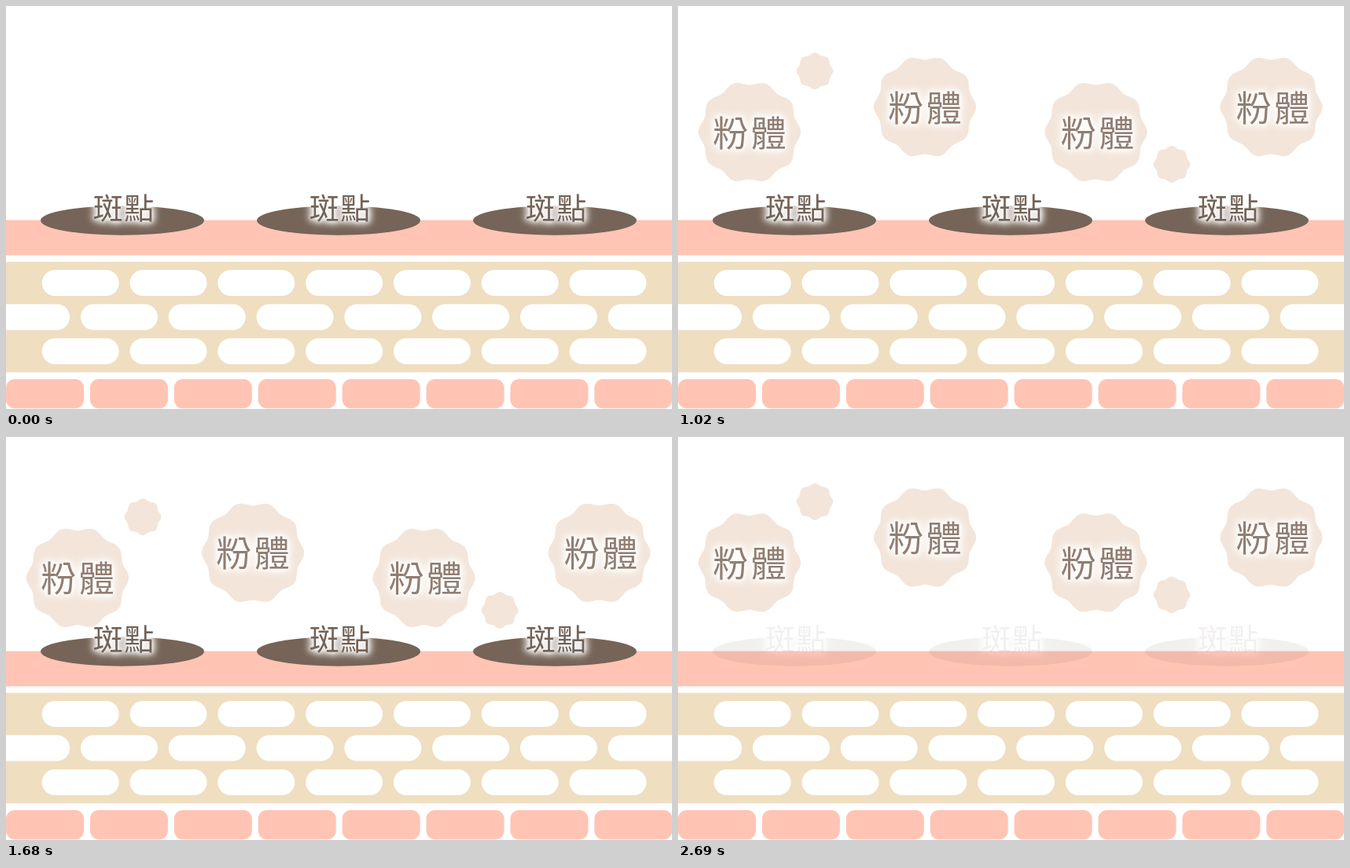
Write an HTML page that moves like this. It is 847 px wide and 513 px high and loops after 3.22 s.

```html
<!DOCTYPE html>
<html lang="zh-Hant">
<head>
<meta charset="utf-8">
<style>
html, body { margin: 0; width: 100%; height: 100%; overflow: hidden; background: #fff; }
svg { display: block; }
text {
  font-family: "Noto Sans CJK TC", "Noto Sans CJK", "Noto Sans CJK JP", sans-serif;
  text-anchor: middle;
  filter: drop-shadow(0 0 2px #fff) drop-shadow(0 0 4px #fff) drop-shadow(0 0 5px #fff);
}
#spots text { font-size: 38px; letter-spacing: 1.5px; fill: #736257; }
#powder text { font-size: 45px; letter-spacing: 3.5px; fill: #917e72; }
#powder path { fill: #f3e5da; }
#spots ellipse { fill: #756457; }
</style>
</head>
<body>
<svg width="847" height="513" viewBox="0 0 847 513">
  <g id="skin"></g>
  <g id="spots"></g>
  <g id="powder"></g>
</svg>
<script>
const LOOP = 3220, STEP = 30, PINK = '#ffc4b4';
const [skin, spots, powder] = ['skin', 'spots', 'powder'].map(id => document.getElementById(id));

const repeat = (n, make) => Array.from({ length: n }, (_, i) => make(i)).join('');
const rect = (x, y, w, h, r, fill) =>
  `<rect x="${x}" y="${y}" width="${w}" height="${h}" rx="${r}" fill="${fill}"/>`;
const label = (x, y, s) => `<text x="${x}" y="${y}">${s}</text>`;

// Closed wavy outline: mean radius r, wave height a, n lobes
function blob(cx, cy, r, a, n) {
  const points = repeat(180, i => {
    const q = i * Math.PI / 90, d = r + a * Math.cos(n * q);
    return `${i ? 'L' : 'M'}${(cx + d * Math.cos(q)).toFixed(2)} ${(cy + d * Math.sin(q)).toFixed(2)}`;
  });
  return `<path d="${points}Z"/>`;
}
const grain = (x, y) => blob(x, y, 22.2, 1.2, 8);

// Every second row of cells is shifted by a little over half a cell
const cellRow = j => repeat(8 - (j + 1) % 2, i =>
  rect(45.7 - j % 2 * 62.6 + i * 111.8, 336 + j * 43.5, 98, 33, 16.5, '#fff'));

skin.innerHTML =
  rect(0, 272.6, 847, 44.8, 0, PINK) +
  rect(0, 325.7, 847, 140.6, 0, '#efdec0') +
  repeat(3, cellRow) +
  repeat(8, i => rect(i * 106.9, 475, 99, 37.2, 11, PINK));

spots.innerHTML = repeat(3, i =>
  `<ellipse cx="${148 + i * 275}" cy="273" rx="104" ry="18.7"/>` +
  label(150.2 + i * 275, 270.7, '斑點'));

// Two pairs, the right one of each pair hanging higher
powder.innerHTML = repeat(4, i => {
  const pair = i >> 1, side = i % 2;
  const x = 91 + pair * 440.5 + side * 223, y = 160 - side * 32;
  return blob(x, y, 62.6, 2.5, 10) + label(x + 1.7 + pair * 2, y + 18, '粉體');
}) + grain(174, 82.3) + grain(628, 201);

// Fall past the resting height, rebound, dip once more and settle
function height(t) {
  if (t < 1500) return 41 - Math.abs(t - 1200) * (t < 1200 ? .225 : .137);
  return Math.max(0, 21 - Math.abs(t - 1695) * .108);
}

function fade(t) {
  const steps = Math.floor((t - 2060) / STEP) + 1;
  return 1 - .041 * Math.max(0, Math.min(22, steps));
}

const start = performance.now();
function draw() {
  const t = (performance.now() - start) % LOOP;
  powder.setAttribute('transform', `translate(0 ${height(Math.floor(t / STEP) * STEP)})`);
  spots.setAttribute('opacity', fade(t));
  requestAnimationFrame(draw);
}
draw();
</script>
</body>
</html>
```
